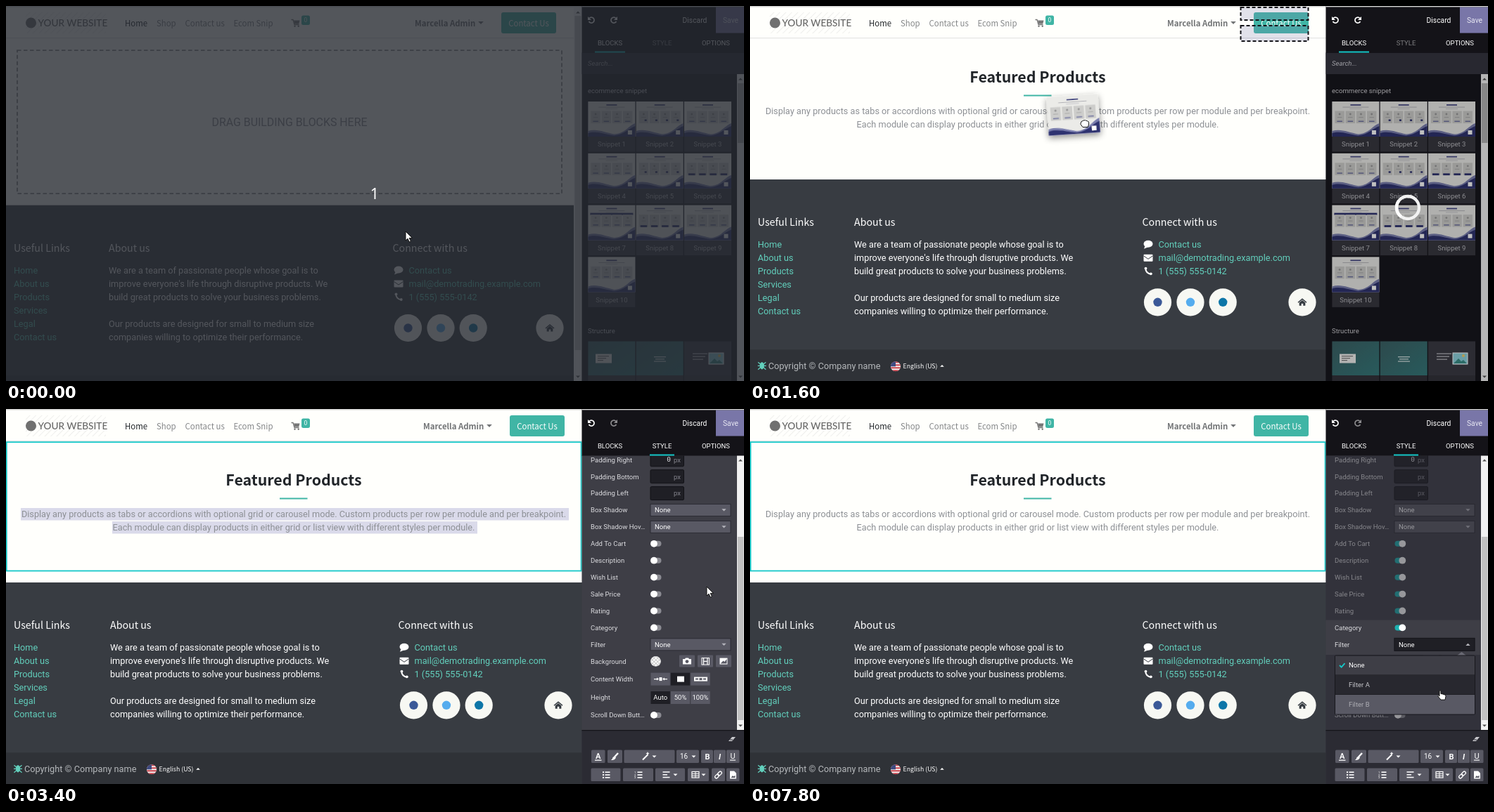
An HTML page that plays this animation: 1049x534 px, repeating every 8 s.

```html
<!DOCTYPE html>
<html lang="en">
<head>
<meta charset="utf-8">
<title>Website builder</title>
<style>
html, body { margin: 0; width: 100%; height: 100%; overflow: hidden; background: #fffffc; }
svg { display: block; width: 100%; height: 100%; }
text { font-family: Roboto, sans-serif; white-space: pre; }
.c { font-family: 'Noto Sans CJK SC', 'Noto Sans CJK JP', 'Noto Sans CJK', 'Noto Sans', sans-serif; }
.l { font-family: Lato, sans-serif; }
.o { font-family: 'Noto Sans', sans-serif; }
.mono { font-family: 'DejaVu Sans Mono', monospace; }
.m { text-anchor: middle; }
.e { text-anchor: end; }
.b { font-weight: 700; }
.s { font-weight: 500; }
.i { font-style: italic; }
</style>
</head>
<body>
<svg id="stage" viewBox="0 0 1049 534"></svg>
<script>
const LOOP = 8000, STEP = 100, SCROLL = 156.4;
const TEAL = '#40b5a5', CYAN = '#14c8c8', LINK = '#62cfbc', BTN = '#595964', DARK = '#1f1f25', NAVY = '#2e3270';
const BODY = 12.72, SMALL = 9.54, NAV = 11.39;
const PANEL = 818.45, PANEL_W = 230.55;

// Text is placed by the middle of its capitals.
const T = (x, cy, s, size = SMALL, fill = '#fff', cls = '') =>
  `<text x="${x}" y="${(cy + size * 0.36).toFixed(2)}" font-size="${size}" fill="${fill}" class="${cls}">${s}</text>`;
const R = (x, y, w, h, fill, o = '') => `<rect x="${x}" y="${y}" width="${w}" height="${h}" fill="${fill}" ${o}/>`;
const C = (x, y, r, fill, o = '') => `<circle cx="${x}" cy="${y}" r="${r}" fill="${fill}" ${o}/>`;
const P = (d, fill = '#fff', o = '') => `<path d="${d}" fill="${fill}" ${o}/>`;
const L = (d, stroke = '#fff', w = 1.3, o = '') => `<path d="${d}" fill="none" stroke="${stroke}" stroke-width="${w}" ${o}/>`;
const G = (x, y, s, o = '') => `<g transform="translate(${x} ${y}) ${o}">${s}</g>`;
const layer = (id, s) => `<g id="${id}">${s}</g>`;
const down = (x, y, fill = '#fff', r = 3) => P(`M${x - r} ${y - r / 2}h${2 * r}l${-r} ${r}z`, fill);
const up = (x, y, fill = '#fff', r = 3) => P(`M${x - r} ${y + r / 2}h${2 * r}l${-r} ${-r}z`, fill);

const bar = (x, w, top, bottom, thumb) =>
  R(x, top, w, bottom - top, '#f1f1f1') + thumb +
  up(x + w / 2, top + 7, '#505050') + down(x + w / 2, bottom - 6, '#505050');

function header(dx) {
  const items = [[169, 'Home', '#212529'], [214, 'Shop'], [254.5, 'Contact us'], [323.5, 'Ecom Snip']];
  return R(0, 0, 819, 46, '#fffffc') + R(0, 0, 819, 1.5, '#cfcfcf') + R(0, 45, 819, 1.2, '#e4e4e4') +
    R(28, 9, 114, 30, 'url(#hatch)') + C(35.5, 24, 7.5, '#707070') +
    T(45.5, 24, 'YOUR WEBSITE', 13.6, '#666', 'l s') +
    items.map(([x, s, f = '#858789']) => T(x, 24.5, s, NAV, f, 'c')).join('') +
    L('M405.5 19.5h2.5l2 7h6.5', '#777', 1.3) + P('M409 20.5h8.5l-1.3 5h-6z', '#777') +
    C(410.5, 28.7, 1.2, '#777') + C(415.7, 28.7, 1.2, '#777') +
    R(420, 13.5, 12, 13.5, TEAL, 'rx="2.5"') + T(426, 20.3, '0', 8.6, '#fff', 'c m') +
    T(581 + dx, 24.5, 'Marcella Admin', NAV, '#727476', 'c b') + down(675 + dx, 24, '#727476', 3.8) +
    R(704 + dx, 9, 78, 30, TEAL, 'rx="3"') + T(743 + dx, 24.5, 'Contact Us', NAV, '#fff', 'c m');
}

function footer(top, about, connect, dx) {
  const y = top - 283.7;
  const lines = (x, list, fill) => list.map((s, i) => T(x, y + 376 + i * 19.1, s, BODY, fill)).join('');
  const social = [[22, '#3b5998'], [68.5, '#55acee'], [114.7, '#0d76a8']];
  const home = 773 + dx, cx = connect + 8.5, cy = y + 458.5, ly = y + 513 + 37;
  return R(0, top, 819, 534 - top, '#383c42') + R(0, y + 526, 819, 60, '#2f3237') +
    T(11, y + 345, 'Useful Links', 14.23, '#fff', 'c') +
    T(about, y + 345, 'About us', 14.23, '#fff', 'c') +
    T(connect, y + 345, 'Connect with us', 14.23, '#fff', 'c') +
    lines(11, ['Home', 'About us', 'Products', 'Services', 'Legal', 'Contact us'], LINK) +
    lines(about, ['We are a team of passionate people whose goal is to',
      'improve everyone\'s life through disruptive products. We',
      'build great products to solve your business problems.', '',
      'Our products are designed for small to medium size',
      'companies willing to optimize their performance.'], '#fff') +
    lines(connect + 23, ['Contact us', 'mail@demotrading.example.com', '1 (555) 555-0142'], LINK) +
    `<ellipse cx="${cx}" cy="${y + 375.5}" rx="6.5" ry="5" fill="#fff"/>` + P(`M${cx - 4} ${y + 377}l-2 5.5 6-2.5z`) +
    R(cx - 6.5, y + 390.5, 13, 10, '#fff', 'rx="1"') + L(`M${cx - 6.5} ${y + 392.5}l6.5 4.5 6.5-4.5`, '#383c42', 1) +
    L(`M${cx - 3.8} ${y + 409.5}q0 8 8 9`, '#fff', 2) + C(cx - 3.5, y + 410.3, 1.9, '#fff') + C(cx + 3.8, y + 418, 1.9, '#fff') +
    social.map(([x, f]) => C(connect + x, cy, 19.6, '#f7f8f3') + C(connect + x, cy, 6.2, f)).join('') +
    C(home, cy, 19.6, '#f7f8f3') +
    P(`M${home} ${cy - 5.5}l6.5 5.5-1 1-5.5-4.6-5.5 4.6-1-1zM${home - 4.3} ${cy + .7}l4.3-3.6 4.3 3.6v4.3h-3v-3h-2.6v3h-3z`, '#343a40') +
    L(`M11.5 ${ly - 6}l3 2.5h5l3-2.5M11 ${ly - 1}h12M11.5 ${ly + 4.5}l3-3h5l3 3M17 ${ly - 4}v8`, LINK, 1.3) +
    `<ellipse cx="17" cy="${ly - 1}" rx="3.2" ry="5" fill="${LINK}"/>` +
    T(26, y + 549, 'Copyright © Company name', BODY, '#b6b9bc') +
    G(207, ly, `<g clip-path="url(#disc)">${R(-7, -7, 14, 14, '#f4f0f0')}${[0, 1, 2, 3].map(i =>
      R(-7, -7 + i * 4, 14, 2, '#c8414b')).join('')}${R(-7, -7, 7, 7, '#3c4a80')}</g>`) +
    T(217.5, y + 550, 'English (US)', 8.75, '#fff', 'c') + up(273, y + 549, '#fff', 2.8);
}

const zones = x => [[2, 18], [28, 22]].map(([y, h]) =>
  R(x, y, 96, h, 'rgba(120,120,170,.22)', 'stroke="#15151a" stroke-width="2" stroke-dasharray="5 3"')).join('');

const emptyPage = R(0, 0, 819, 534, '#fffffc') + header(0) + layer('zoneFill', R(15, 63, 776, 204, '#e8e8ee')) +
  R(16, 63.2, 774, 204, 'none', 'stroke="#8d8d90" stroke-width="1.8" stroke-dasharray="5.5 3.5"') +
  T(403, 165, 'DRAG BUILDING BLOCKS HERE', 15.9, '#8d8d92', 'm') + footer(283.7, 146, 549.5, 0) +
  layer('zonesA', zones(685.5)) + bar(807, 12, 2, 534, R(808.5, 14, 9, 476, '#c1c1c1'));

const filledPage = R(0, 0, 819, 534, '#fffffc') + header(12) +
  layer('selected', R(21, 141, 779, 17.5, '#dadaea') + R(151, 160, 519, 17.5, '#dadaea')) +
  T(409, 101.5, 'Featured Products', 21.35, '#212529', 'c b m') + R(389, 126.5, 39.5, 2, TEAL) +
  T(409, 149.5, 'Display any products as tabs or accordions with optional grid or carousel mode. Custom products per row per module and per breakpoint.', BODY, '#8d9095', 'm') +
  T(409, 168.6, 'Each module can display products in either grid or list view with different styles per module.', BODY, '#8d9095', 'm') +
  footer(247, 148, 557.5, 12) + layer('zonesB', zones(697.5)) +
  layer('caret', R(311.6, 86, 1.1, 29, '#212529')) +
  layer('outline', R(.8, 47.2, 816.8, 183.3, 'none', `stroke="${CYAN}" stroke-width="1.8"`)) +
  layer('handles', [72, 205.5].map(y => R(401, y - 8, 16, 16, '#85858a') +
      L(`M409 ${y - 5}v7`, '#fff', 2.6) + P(`M404.5 ${y}h9l-4.5 5z`)).join('') +
    R(385.5, 26.5, 24, 18.5, '#4a4a54', 'rx="1.5"') +
    [0, 1, 2, 3, 4, 5].map(i => R(392.5 + i % 3 * 4, i < 3 ? 32.5 : 36.5, 2.4, 2.4, '#fff')).join('') +
    R(414.5, 26.5, 18.5, 18.5, '#843f4f', 'rx="1.5"') +
    L('M419 32h9M422 31.5v-1.5h3.5v1.5M420 32.5v8.5h7v-8.5M422.3 34.5v4.5M424.7 34.5v4.5', '#eed', 1.1));

function thumb(i) {
  const cards = [0, 1, 2, 3].map(k => {
    const x = 4 + 15.2 * k;
    const button = i == 6 || i == 8 ? R(x + 2, 28.5, 9.5, 2.8, NAVY)
      : i % 3 == 2 ? R(x + 8, 25.5, 3, 2.4, NAVY) : R(x + 3, 27.5, 7.5, 1.5, '#6f73a0');
    return R(x, 13.5, 13.4, 17.5, '#cdcdcb') + C(x + 6.7, 18, 1.4, '#999') + R(x + 3.5, 22, 6.4, 1, '#aaa') + button;
  }).join('');
  return R(0, 0, 67, 50, '#ebebe8') + R(26, 4, 15, 1.8, '#4a4d86') + R(15, 7.6, 37, .9, '#b0b0b6') +
    R(25, 10, 17, .8, '#bdbdc2') + (i == 7 ? R(3, 11, 61, 3, NAVY) : '') + cards +
    P('M0 42C12 38 24 44 37 46.5C52 46 58 34 67 31V50H0Z', '#7a7eae') +
    P('M0 45C12 41 24 47 37 48.5C52 47 58 38 67 35V50H0Z', NAVY) + R(56.5, 41, 6, 6, '#fff');
}

const tiles = [...Array(10).keys()].map(i => G((827.4 + i % 3 * 68.3).toFixed(1), (136 + (i / 3 | 0) * 73.8).toFixed(1),
  R(0, 0, 67, 71.5, '#383840') + thumb(i + 1) + T(33.5, 61, 'Snippet ' + (i + 1), SMALL, '#bdbdc2', 'm'))).join('');

const blocksPanel = R(PANEL, 66, PANEL_W, 468, '#17161d') + R(PANEL, 67, PANEL_W, 30, '#282830') +
  T(827, 81.5, 'Search...', SMALL, '#a0a0a6', 'i') + T(827, 120.5, 'ecommerce snippet', SMALL, '#d0d0d4') + tiles +
  T(827, 462.5, 'Structure', SMALL, '#d0d0d4') +
  ['url(#teal)', 'url(#teal)', '#3a3a44'].map((f, i) => R(827.4 + i * 68.3, 477.5, 67, 48.5, f) +
    R(827.4 + i * 68.3, 526, 67, 8, '#33333b')).join('') +
  R(838, 495.5, 23, 13, '#f0f0ee') + [0, 1, 2].map(i =>
    R(841, 498 + i * 3, 16 - i * 4, 1.2, '#777') + R(921 + i % 2 * 2, 499 + i * 3.2, 17 - i % 2 * 4, 1.3, '#cfdede') +
    R(976, 494.5 + i * 4, 21 - i * 3, 1.3, '#b5b5bb')).join('') +
  R(999, 494, 21, 16, '#8fd3dd', 'stroke="#fff"') + P('M1000 509l7-7 4 4 3-2 5 5z', '#3b8e88') + C(1014, 498, 2, '#f2cf6a') +
  bar(1039, 10, 97, 534, R(1040, 110, 8.5, 85, '#b4b4b4')) +
  layer('loading', R(PANEL, 97, PANEL_W, 437, '#000', 'opacity=".25"') + C(935, 287, 16, 'none', 'stroke="#f2f2f2" stroke-width="4.3"') +
    layer('spin', L('M935 271a16 16 0 0 1 16 16', '#fff', 4.3)));

const inputs = [['Margin Top', '0'], ['Margin Right', ''], ['Margin Bottom', ''], ['Margin Left', ''],
  ['Padding Top', '50'], ['Padding Right', '0'], ['Padding Bottom', ''], ['Padding Left', '']];
const switches = ['Add To Cart', 'Description', 'Wish List', 'Sale Price', 'Rating', 'Category'];
const rowY = i => +(109 + 23.92 * i).toFixed(2);
const label = (y, s) => T(831, y, s, SMALL, '#dcdce0');
const select = y => R(916, y - 8.5, 114, 17, BTN, 'stroke="#2b2b33"') + T(922, y, 'None') + down(1020.5, y, '#b5b5bc', 3.2);
const toggle = (y, id) => R(916.5, y - 4, 15, 8, '#8b8b92', `rx="4" id="track${id}"`) + C(921, y, 4.9, '#fff', `id="knob${id}"`);
const segments = y => [0, 1, 2].map(i => R(916 + i * 28.4, y - 9.5, 28.4, 19, i == (y > 550 ? 0 : 1) ? DARK : BTN, 'stroke="#3e3e46"')).join('');

const rows = inputs.map(([s, v], i) => {
    const y = rowY(i);
    return label(y, s) + R(916, y - 9.5, 47.5, 19, DARK, 'stroke="#121217" rx="1.5"') +
      T(945, y - .5, v, SMALL, '#e0e0e4', 'mono e') + T(949, y, 'px', SMALL, '#85858e');
  }).join('') +
  ['Box Shadow', 'Box Shadow Hov…'].map((s, i) => label(rowY(8 + i), s) + select(rowY(8 + i))).join('') +
  switches.map((s, i) => label(rowY(10 + i), s) + toggle(rowY(10 + i), i)).join('') +
  label(rowY(16), 'Filter') + select(rowY(16)) + label(515.7, 'Background') +
  C(923.5, 515.7, 7.3, '#fff') + C(923.5, 515.7, 7.3, 'url(#check)') +
  [957, 983, 1009].map(x => R(x, 507, 22, 17, BTN, 'rx="1"')).join('') +
  P('M962 512.5h3l1-1.5h4l1 1.5h3v7.5h-12z') + C(968, 516, 2.4, BTN) +
  R(989, 511, 10.5, 9.5, 'none', 'stroke="#fff"') + L('M991.5 511v9.5M997 511v9.5M991.5 515.7h5.5') +
  R(1014.5, 511, 11, 9, '#fff') + P('M1015.5 519l4-4 2 1.5 3-4v6.5z', BTN) +
  label(541, 'Content Width') + segments(541) +
  R(928.5, 538.5, 4, 5, '#fff') + L('M921 541h5M940 541h-5', '#fff', 1.4) + P('M925 539l3 2-3 2zM936 539l-3 2 3 2z') +
  R(954, 537, 10, 8, '#fff') + R(978, 538, 19, 6, '#fff') + L('M980 541h4M991 541h4', BTN, 2) + R(985.5, 539.5, 4, 3, BTN) +
  label(567.4, 'Height') + segments(567.4) +
  ['Auto', '50%', '100%'].map((s, i) => T(930.2 + i * 28.4, 567.4, s, SMALL, '#fff', 'm')).join('') +
  label(592.3, 'Scroll Down Butt…') + toggle(592.3, 6);

const tool = (x, y, w) => R(x, y, w, 18.5, BTN, 'rx="1.5"');
const ring = x => R(x, 519, 6.5, 4, 'none', 'rx="2" stroke="#fff" stroke-width="1.3"');
const toolbar = R(PANEL, 457, PANEL_W, 77, '#2b2b33') + R(PANEL, 457, PANEL_W, 1.3, '#16161b') +
  P('M1027 473l5-6h5l-5 6z', '#c9c9ce') + L('M1029 471h4', '#2b2b33', 1) +
  [[832, 19.5], [855, 21], [878.5, 72], [953, 32], [988, 17], [1006, 17], [1024, 18.5]].map(([x, w]) => tool(x, 485.5, w)).join('') +
  [[831.5, 42], [877, 43], [923, 42], [969, 30], [1003, 19], [1024, 18.5]].map(([x, w]) => tool(x, 511.5, w)).join('') +
  T(841.7, 494, 'A', 11, '#fff', 'b m') + R(837, 499.5, 9.5, 1.3, '#fff') +
  L('M870 490l-5 5.5', '#fff', 2.4) + P('M865 494.5l2 2q-2 4-7 3.5 2.5-1.5 2.5-4z') +
  L('M905 499.5l7.5-7.5', '#fff', 2) + P('M912 488l.8 1.7 1.7.8-1.7.8-.8 1.7-.8-1.7-1.7-.8 1.7-.8z') + down(921.5, 495) +
  T(958, 494.7, '16', 10, '#fff') + down(977.5, 495) +
  T(997, 494.7, 'B', 11, '#fff', 'b m') + T(1014.5, 494.7, 'I', 11, '#fff', 'b i m') +
  T(1033, 494, 'U', 11, '#fff', 'm') + R(1029, 499.5, 8, 1.1, '#fff') +
  [0, 1, 2].map(i => {
    const y = 517 + i * 3.8;
    return R(848, y - .8, 2, 2, '#fff') + R(851.5, y - .6, 7, 1.6, '#fff') + T(893, y + .2, i + 1, 4.2) +
      R(897.5, y - .6, 7, 1.6, '#fff') + R(933.5, y - .8, 10 - i % 2 * 3.5, 1.5, '#fff');
  }).join('') + down(951.5, 521) + R(975, 516.5, 10, 8.5, 'none', 'stroke="#fff" stroke-width="1.2"') +
  L('M975 519.5h10M975 522.3h10M980 517v8', '#fff', 1) + down(991.5, 521) +
  `<g transform="rotate(-45 1012.5 521)">${ring(1006.5)}${ring(1012)}</g>` +
  P('M1029 515.5h6l3 3v8h-9z') + P('M1030.5 525l2.5-3 1.5 1.5 2-2v3.5z', BTN);

const titleIcons = [
  'M968 82l4-4M969 79l2-2a2 2 0 0 1 2.5 2.5l-1 1M971 83l-2 2a2 2 0 0 1-2.5-2.5l1-1',
  'M983 77.5h6l1.5 1.5v6h-7.5zM985 77.5v2.5h3v-2.5M985 85v-3h4v3',
  'M1001.5 77.5h6v6h-6zM1003.5 85.5h6v-6',
  'M1019.5 78.5h8M1022 78v-1.5h3v1.5M1020.5 79v6.5h6v-6.5M1022.5 80.5v3.5M1024.5 80.5v3.5'
].map(d => L(d, '#aaaab2', 1.1)).join('');

const filterY = rowY(16) - SCROLL;
const menu = R(PANEL, 67, 220, 233.5, '#26262e', 'opacity=".48"') + R(PANEL, 350, 220, 107, '#26262e', 'opacity=".48"') +
  R(916, filterY - 9, 114, 18, DARK, 'stroke="#15151a"') + T(922, filterY, 'None') + up(1020.5, filterY, '#b5b5bc', 3.2) +
  P('M1005 351l6.5-5 6.5 5z', '#6a6a74') + R(831, 350.5, 200, 85, '#17171c', 'rx="2"') +
  R(832, 351.5, 198, 27, '#3e3e46') + R(832, 379, 198, 27.5, '#28282f') + R(832, 407, 198, 27.5, BTN) +
  L('M838 365l2.7 2.7 4.8-5.5', CYAN, 1.8) + T(851, 365, 'None') + T(851, 393, 'Filter A', SMALL, '#c4c4c9') +
  T(851, 421, 'Filter B', SMALL, '#adadb3');

const stylePanel = R(PANEL, 66, PANEL_W, 468, '#3e3e46') + `<g clip-path="url(#list)">` +
  layer('rows', R(PANEL, 67, 220.5, 29.5, '#303038') + T(831, 81.5, 'Snippet 9', SMALL, '#fff', 's') + titleIcons + rows) + '</g>' +
  layer('menu', menu) + bar(1039, 10, 66, 457, R(1040, 78, 8.5, 261, '#c1c1c1', 'id="thumb"')) + toolbar;

const undo = L('M-3-2.5a4 4 0 1 1-.5 4.5', '#fff', 1.7) + P('M-5-5v5h5z');
const topBar = R(PANEL, 0, PANEL_W, 66.5, '#141318') + G(832, 20, undo) +
  layer('redo', G(864, 20, undo, 'scale(-1 1)')) + T(979, 20.5, 'Discard', 10.34, '#fff', 'm') +
  R(1009, 1.5, 40, 37, '#7976a8') + T(1030, 20.5, 'Save', 10.34, '#e6e6f2', 'm') + R(PANEL, 0, PANEL_W, 1.4, '#cfcfcf') +
  T(858.5, 52.5, 'BLOCKS', SMALL, '#fff', 'm') + layer('styleTab', T(932.5, 52.5, 'STYLE', SMALL, '#fff', 'm')) +
  T(1009, 52.5, 'OPTIONS', SMALL, '#fff', 'm') + R(837, 64.5, 43, 2, CYAN, 'id="tabLine"');

const ink = 'stroke="#111" stroke-width="1" stroke-linejoin="round"';
const pointers = layer('arrow', P('M0 0v13l3-2.8 2.2 4.8 2.2-1-2.2-4.6h4.3z', '#fff', ink)) +
  layer('fist', P('M-5-1.5q0-2 2-2 .8-1.7 2.5-1 1.5-1 2.5.3 1.8-.6 2.3.9 1.7 0 1.7 2v2.8l-1.5 3.5h-7l-3-4q0-2 .5-2.5z', '#fff', ink)) +
  layer('hand', P('M0 .5q1-1.5 2 0v4l2.5.4 3.5 1.2q1.3.6 1 2l-1 5h-6l-4.5-5.5q.5-1.6 2.5.3z', '#fff', ink));

document.getElementById('stage').innerHTML = `<defs>
<pattern id="hatch" width="6" height="6" patternUnits="userSpaceOnUse" patternTransform="rotate(45)">${R(0, 0, 1, 6, '#efefed')}</pattern>
<pattern id="check" width="5" height="5" patternUnits="userSpaceOnUse">${R(0, 0, 2.5, 2.5, '#c9c9c9')}${R(2.5, 2.5, 2.5, 2.5, '#c9c9c9')}</pattern>
<linearGradient id="teal" x2="1" y2="1"><stop stop-color="#3c6266"/><stop offset="1" stop-color="#35787a"/></linearGradient>
<clipPath id="disc">${C(0, 0, 7, '#fff')}</clipPath><clipPath id="list">${R(PANEL, 66.5, 220.5, 390.5, '#fff')}</clipPath>
<filter id="soft" x="-30%" y="-30%" width="160%" height="170%"><feDropShadow dx="0" dy="3" stdDeviation="4.5" flood-opacity=".45"/></filter></defs>` +
  layer('empty', emptyPage) + layer('filled', filledPage) + layer('blocks', blocksPanel) + layer('style', stylePanel) + topBar +
  layer('drag', `<g filter="url(#soft)">${G(-33.5, -25, thumb(9))}</g>`) +
  layer('count', R(0, 0, 1049, 534, '#262931', 'opacity=".79"') + T(524, 267, '1', 21.5, '#fff', 'o m')) +
  layer('cursor', pointers);

const el = {};
document.querySelectorAll('#stage [id]').forEach(n => el[n.id] = n);
const show = (id, on) => el[id].setAttribute('display', on ? 'inline' : 'none');
const set = (id, k, v) => el[id].setAttribute(k, v);
const within = (t, a, b) => t >= a && t < b;
const ramp = (t, a, b) => Math.min(1, Math.max(0, (t - a) / (b - a)));

// Mouse stops: time, x, y
const stops = [[0, 568, 321], [400, 568, 321], [700, 985, 308], [800, 985, 310], [1200, 818, 264], [1600, 475.5, 167.5],
  [2000, 475.5, 167.5], [2400, 760, 200], [2500, 760, 200], [2800, 1043, 254], [2900, 1043, 254], [3200, 1043, 358],
  [3300, 1043, 358], [3400, 996, 253], [3800, 922, 187], [4300, 922, 188], [4700, 924, 211], [5000, 924, 212],
  [5200, 926, 234], [5400, 922, 235], [5600, 922, 236], [5800, 922, 262], [6200, 922, 262], [6500, 922, 285],
  [6800, 922, 310], [7100, 975, 330], [7300, 975, 332], [7600, 982, 400], [7700, 982, 400], [7800, 980, 401], [8000, 980, 401]];
const clicks = [4000, 4800, 5600, 6100, 6500, 6800];

function mouse(t) {
  const i = stops.findIndex(s => s[0] > t);
  const [a, x, y] = stops[i - 1], [b, u, v] = stops[i], k = (t - a) / (b - a);
  return [x + (u - x) * k, y + (v - y) * k];
}

function draw(time) {
  const t = Math.floor(time % LOOP / STEP) * STEP;
  const filled = t >= 1300, styling = t >= 2200, dragging = within(t, 900, 1700);
  const [x, y] = mouse(t);
  show('count', t < 400);
  show('empty', !filled);
  show('filled', filled);
  show('zoneFill', dragging);
  show('zonesA', dragging);
  show('zonesB', dragging);
  show('selected', within(t, 2600, 4000));
  show('caret', within(t, 2200, 2600) || within(t, 4000, 4400) || within(t, 4900, 6000) || within(t, 6500, 7000));
  show('outline', t >= 2600);
  show('handles', within(t, 2600, 3100));
  show('blocks', !styling);
  show('loading', within(t, 1600, 2200));
  set('spin', 'transform', `rotate(${t * 0.36} 935 287)`);
  show('style', styling);
  set('styleTab', 'opacity', styling ? 1 : 0.45);
  set('redo', 'opacity', t >= 2100 ? 0.5 : 1);
  set('tabLine', 'x', styling ? 915 : 837);
  set('tabLine', 'width', styling ? 35 : 43);

  const scrolled = ramp(t, 2900, 3200);
  set('rows', 'transform', `translate(0 ${-SCROLL * scrolled})`);
  set('thumb', 'y', 78 + 104 * scrolled);
  set('thumb', 'fill', within(t, 2800, 3400) ? '#a3a3a3' : '#c1c1c1');
  clicks.forEach((at, i) => {
    set('track' + i, 'fill', t >= at ? '#1cb0b0' : '#8b8b92');
    set('knob' + i, 'cx', t >= at ? 927.3 : 921);
  });
  show('menu', t >= 7200);

  const k = ramp(t, 1200, 1600);
  show('drag', dragging);
  set('drag', 'transform', `translate(${x + 7 - 23 * k} ${y - 5 - 7.5 * k}) rotate(${-3.4 - 0.5 * k}) scale(${1 + 0.09 * k})`);
  set('cursor', 'transform', `translate(${x} ${y})`);
  show('fist', dragging);
  show('hand', t >= 7300);
  show('arrow', !dragging && t < 7300);
}

const start = performance.now();
(function tick() {
  draw(performance.now() - start);
  requestAnimationFrame(tick);
})();
</script>
</body>
</html>
```
